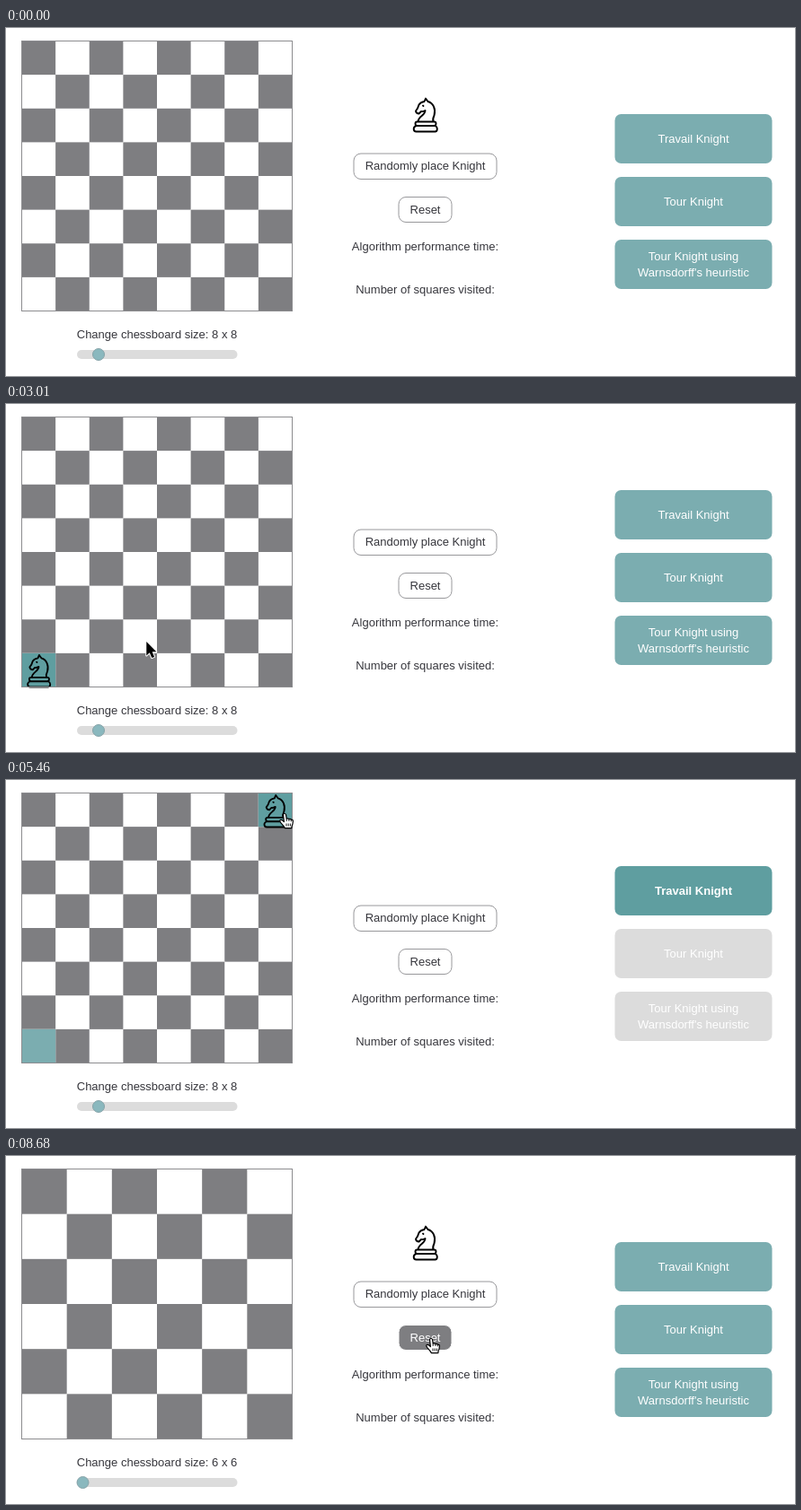
Recreate the animation shown at these times as an HTML page with a canvas. Size 878 by 388 pixels, loop 8.96 s.

```html
<!DOCTYPE html>
<html lang="en">
<head>
<meta charset="utf-8">
<title>Knight on a chessboard</title>
<style>
html, body { margin: 0; width: 100%; height: 100%; overflow: hidden; background: #fff; }
canvas { display: block; width: 878px; height: 388px; }
</style>
</head>
<body>
<canvas id="stage"></canvas>
<script>
const LOOP = 8960, STEP = 70;
const W = 878, H = 388;
const GRAY = '#7e7e81', TEAL = '#5f9ea0', SOFT = '#7badb0', OFF = '#dcdcdc', INK = '#36363c';
const FONT = '"Liberation Sans", Arial, sans-serif';
const BOARD = { x: 17.5, y: 14.5, size: 301 };

const canvas = document.getElementById('stage');
const ratio = window.devicePixelRatio || 1;
canvas.width = W * ratio;
canvas.height = H * ratio;
const ctx = canvas.getContext('2d');

const knightPath = new Path2D(
  'M6 27 C6 21 14 20 14 14.5 Q11 16 9.5 15.5 L7 18 Q4 18 3.5 15 Q6 12 7 8 Q9 5 13 4.5 ' +
  'L14.5 1 L17 4.5 C23 6 26 13 24 20 Q22 24 23 27 ' +
  'M5 27 H24 Q26 27 26 29 Q26 31.5 24 31.5 H5 Q3 31.5 3 29 Q3 27 5 27 Z ' +
  'M4 31.5 H25 Q27.3 32.5 27.3 35 Q27.3 38 25 38 H4 Q1.2 38 1.2 35 Q1.2 32.5 4 31.5 Z ' +
  'M11.5 9 L12 9.4');
const arrowPath = new Path2D('M0 0 V15.6 L3.5 12.4 L6 18.2 L8.8 17 L6.4 11.3 H11 Z');
const handPath = new Path2D(
  'M-1.5 1.5 Q0 -1 1.5 1.5 L2.2 6.2 Q3.7 5.2 4.9 6.6 Q6.5 5.8 7.3 7.2 Q9.4 7 9.4 9 ' +
  'L9 12 Q8 14 7.8 16.6 H.4 Q-1 14 -4 10.8 Q-6.2 8.2 -4.6 7.5 Q-3 6.9 -.6 9.6 Z');
const handLines = new Path2D('M2.2 6.2 V9 M4.9 6.6 V9 M7.3 7.2 V9.4 M2 11.5 V14.5 M4.2 11.5 V14.5 M6.4 11.5 V14.5');

// start, end, from, to, curve exponent, optional bend
const moves = [
  [280, 700, [418, 361], [475, 88], .8],
  [700, 840, [475, 88], [472, 94], 1],
  [1610, 2520, [472, 94], [45, 295], .5],
  [2870, 3640, [45, 295], [710, 115], .7],
  [4060, 4970, [710, 115], [310, 37], .7],
  [5810, 6580, [310, 37], [760, 122], .7, [520, 0]],
  [7490, 8260, [760, 122], [473, 203], .7]
];
// start, end, radius
const rings = [
  [980, 2590, 22], [3710, 3780, 31], [5320, 5390, 31], [5390, 5460, 24],
  [6790, 6860, 31], [6860, 7000, 24], [8610, 8680, 31]
];
const tour = [[0, 7], [2, 6], [4, 5], [6, 4], [4, 3], [6, 2], [7, 0]];

const smooth = p => p * p * p * (10 - 15 * p + 6 * p * p);
const within = (t, a, b) => t >= a && t < b;

function pointer(t) {
  const move = moves.filter(m => t >= m[0]).pop();
  if (!move) return null;
  const [start, end, a, b, power, bend] = move;
  const k = smooth(Math.min(1, (t - start) / (end - start)) ** power);
  const c = bend || [(a[0] + b[0]) / 2, (a[1] + b[1]) / 2];
  const at = i => (1 - k) ** 2 * a[i] + 2 * k * (1 - k) * c[i] + k * k * b[i];
  return { x: at(0), y: at(1) };
}

function text(str, x, y, color = INK, size = 13, weight = 'normal') {
  ctx.font = `${weight} ${size}px ${FONT}`;
  ctx.fillStyle = color;
  ctx.textAlign = 'center';
  ctx.fillText(str, x, y);
}

function box(x, y, w, h, r, fill, stroke) {
  ctx.beginPath();
  ctx.roundRect(x, y, w, h, r);
  ctx.fillStyle = fill;
  ctx.fill();
  if (stroke) {
    ctx.strokeStyle = stroke;
    ctx.lineWidth = 1;
    ctx.stroke();
  }
}

function knight(x, y, scale = 1, alpha = 1) {
  ctx.save();
  ctx.translate(x, y);
  ctx.scale(scale, scale);
  ctx.globalAlpha = alpha;
  ctx.strokeStyle = '#000';
  ctx.lineWidth = 1.9;
  ctx.lineJoin = ctx.lineCap = 'round';
  ctx.stroke(knightPath);
  ctx.restore();
}

function cell(col, row, n, fill, alpha = 1, label = '') {
  const s = BOARD.size / n, x = BOARD.x + col * s, y = BOARD.y + row * s;
  ctx.fillStyle = '#fff';
  ctx.fillRect(x, y, s, s);
  ctx.globalAlpha = alpha;
  ctx.fillStyle = fill;
  ctx.fillRect(x, y, s, s);
  if (label) text(label, x + s / 2, y + s / 2 + 5.3, '#000', 16);
  ctx.globalAlpha = 1;
}

function board(t, n, mouse) {
  const { x, y, size } = BOARD;
  for (let row = 0; row < n; row++)
    for (let col = 0; col < n; col++)
      if ((row + col) % 2 === 0) cell(col, row, n, GRAY);

  if (within(t, 6930, 8680)) {
    tour.forEach(([c, r], i) => cell(c, r, n, TEAL, Math.min(1, .35 + .13 * i), String(i + 1)));
  } else if (within(t, 2590, 6930)) {
    cell(0, 7, n, t < 3780 ? TEAL : SOFT);
    const hover = mouse.x > 281 && mouse.x < 318 && mouse.y < 52;
    if (t >= 5390 || (t > 4060 && hover)) cell(7, 0, n, TEAL);
    if (t < 5390) knight(23, 279, .96);
    else knight(286.3, 16, .96);
  }
  ctx.strokeStyle = '#8c8c8f';
  ctx.lineWidth = 1;
  ctx.strokeRect(x, y, size, size);
}

function actions(picked, hover) {
  const rest = picked ? OFF : SOFT, lit = picked || hover;
  box(677.5, 96, 175, 55, 7, lit ? TEAL : SOFT);
  box(677.5, 166, 175, 55, 7, rest);
  box(677.5, 236, 175, 55, 7, rest);
  text('Travail Knight', 765, 127.5, '#fff', 13, lit ? 'bold' : 'normal');
  text('Tour Knight', 765, 197.5, '#fff');
  text('Tour Knight using', 765, 258.5, '#fff');
  text("Warnsdorff's heuristic", 765, 276.5, '#fff');
}

function controls(t, n, resetHover) {
  box(387, 140, 159, 28.5, 8, '#fff', '#98989b');
  text('Randomly place Knight', 466.5, 158);
  box(437, 188.5, 59, 28, 8, resetHover ? GRAY : '#fff', resetHover ? '#fff' : '#98989b');
  text('Reset', 466.5, 206.5, resetHover ? '#fff' : INK);
  text('Algorithm performance time:', 466.5, 247.5);
  text('Number of squares visited:', 466.5, 296);
  if (within(t, 6930, 8680)) {
    text('0.00 seconds', 466.5, 271);
    text('7', 466.5, 319.5);
  }
  text(`Change chessboard size: ${n} x ${n}`, 168, 345.5);
  box(79, 359, 178.5, 10, 5, OFF);
  box(n === 8 ? 96.5 : 79, 357.5, 13, 13, 6.5, '#8ab8be', '#86a3a8');
}

function cursor(t, { x, y }, isHand) {
  const ring = rings.find(r => within(t, r[0], r[1]));
  if (ring) {
    ctx.beginPath();
    ctx.arc(x, y, ring[2] - 1.2, 0, Math.PI * 2);
    for (const [color, width] of [['#fff', 4], ['#000', 1.8]]) {
      ctx.strokeStyle = color;
      ctx.lineWidth = width;
      ctx.stroke();
    }
  }
  ctx.save();
  ctx.translate(x, y);
  ctx.lineJoin = 'round';
  if (isHand) {
    ctx.fillStyle = '#fff';
    ctx.strokeStyle = '#000';
    ctx.lineWidth = 1.2;
    ctx.fill(handPath);
    ctx.stroke(handPath);
    ctx.lineWidth = .9;
    ctx.stroke(handLines);
  } else {
    ctx.fillStyle = '#000';
    ctx.strokeStyle = '#fff';
    ctx.lineWidth = 2;
    ctx.stroke(arrowPath);
    ctx.fill(arrowPath);
  }
  ctx.restore();
}

function draw(t) {
  const mouse = pointer(t);
  const n = t < 8680 ? 8 : 6;
  const picked = within(t, 3780, 8680);
  const onTravail = !!mouse && mouse.x > 677 && mouse.y > 96 && mouse.y < 151;
  const onReset = t > 7490 && mouse.x < 496 && mouse.y > 188;
  const onGoal = within(t, 5040, 6580) && mouse.x < 319;

  ctx.setTransform(ratio, 0, 0, ratio, 0, 0);
  ctx.fillStyle = '#fff';
  ctx.fillRect(0, 0, W, H);
  board(t, n, mouse);
  controls(t, n, onReset);
  actions(picked, onTravail);
  if (t < 2590 || t >= 8680) knight(452.5, 77.5);
  if (within(t, 1680, 2590)) knight(mouse.x - 19, mouse.y - 17, 1, .6);
  if (mouse) cursor(t, mouse, onTravail || onReset || onGoal);
}

function tick() {
  const t = performance.now() % LOOP;
  draw(Math.floor(t / STEP) * STEP);
  requestAnimationFrame(tick);
}
tick();
</script>
</body>
</html>
```
